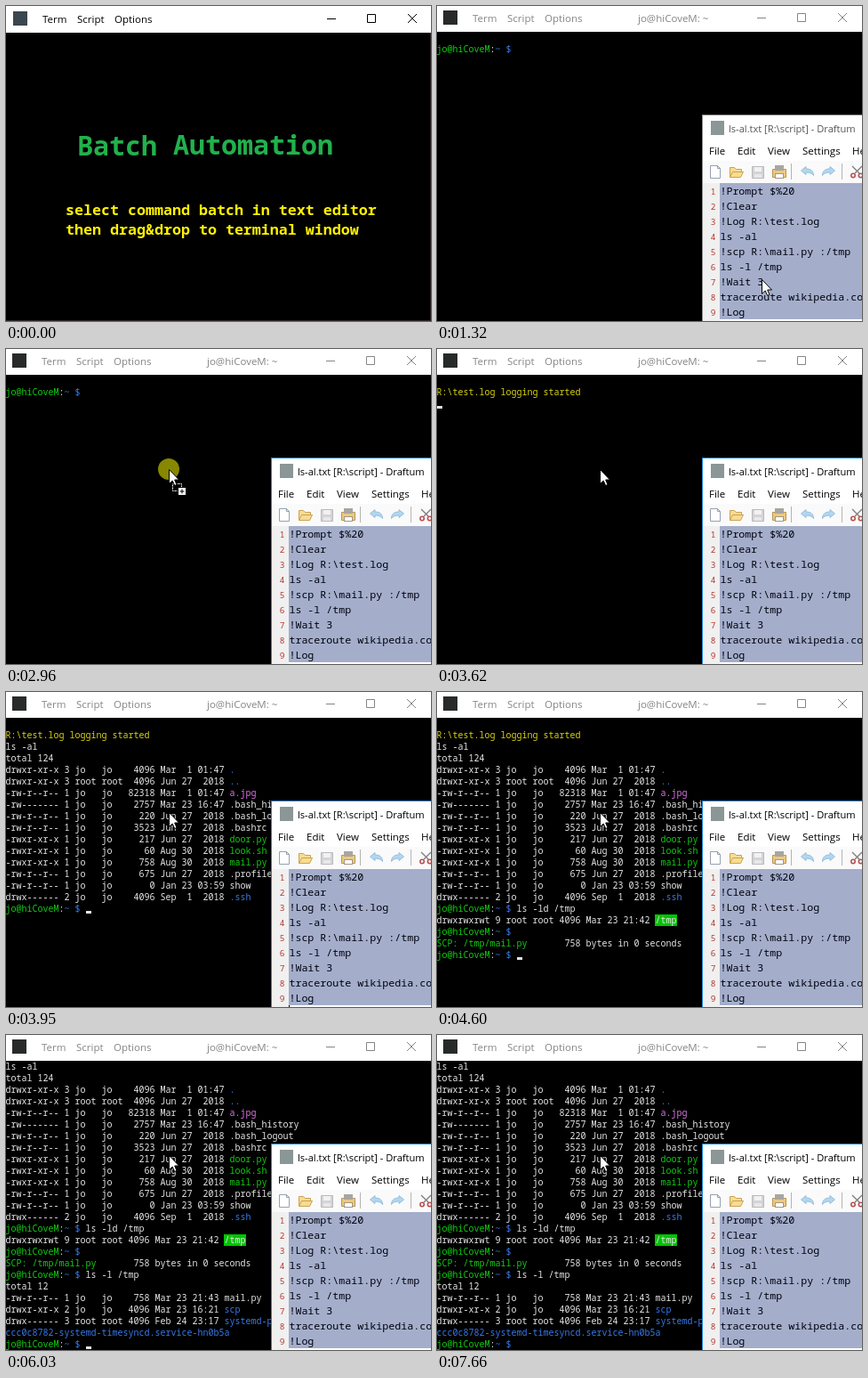
An HTML page that plays this animation: 478 px wide and 354 px high, repeating every 8000 ms.

```html
<!DOCTYPE html>
<html lang="en">
<head>
<meta charset="utf-8">
<title>Batch Automation</title>
<style>
  html, body { margin: 0; width: 100%; height: 100%; overflow: hidden; background: #000; }
  svg { display: block; width: 478px; height: 354px; }
  text { white-space: pre; }
  .ui { font: 11.5px "Open Sans", "Noto Sans", sans-serif; }
  .mono { font-family: "Noto Sans Mono", "DejaVu Sans Mono", monospace; }
  .term { font-size: 10px; font-weight: 500; fill: #e6e6e6; }
  .code { font-size: 11.667px; fill: #00000c; }
  .num { font-size: 9.5px; fill: #b5382a; text-anchor: end; }
  .g { fill: #10cc10; }
  .b { fill: #3679ea; }
  .y { fill: #d8d410; }
  .m { fill: #dc74e6; }
</style>
</head>
<body>
<svg id="stage" viewBox="0 0 478 354" xmlns="http://www.w3.org/2000/svg"></svg>
<script>
const LOOP = 8000;
const ROW = 13, COL = 6;

const rect = (x, y, w, h, fill, more = '') =>
  `<rect x="${x}" y="${y}" width="${w}" height="${h}" fill="${fill}" ${more}/>`;
const text = (x, y, cls, body, more = '') =>
  `<text x="${x}" y="${y}" class="${cls}" ${more}>${body}</text>`;
const path = (d, stroke, fill = 'none', more = '') =>
  `<path d="${d}" stroke="${stroke}" fill="${fill}" ${more}/>`;
const span = (cls, body) => `<tspan class="${cls}">${body}</tspan>`;

// Title bar with menu and window buttons
function titleBar(ink, icon, height, shift, title = '') {
  return rect(0, 0, 478, height, '#fff') +
    `<g transform="translate(${-shift} ${-shift})" fill="${ink}">` +
    rect(8, 6, 16, 16, icon) +
    text(41, 19, 'ui', 'Term') + text(80, 19, 'ui', 'Script') + text(122, 19, 'ui', 'Options') +
    text(227, 19, 'ui', title) +
    path('M361 14.5h10M406.5 9.5h9v9h-9zM452 9l10 10M462 9l-10 10', ink) +
    '</g>';
}

function introScene() {
  const big = 'font-size="30" font-weight="600" fill="#22b14c"';
  const note = 'font-size="16.667" font-weight="600" fill="#fff200"';
  return rect(0, 0, 478, 354, '#000') +
    path('M477.5 30V353.5H0', '#2a2226') +
    titleBar('#000', '#3b464e', 30, 0) +
    text(80, 168, 'mono', 'Batch', big) +
    text(188, 167, 'mono', 'Automation', big) +
    text(67, 235, 'mono', 'select command batch in text editor', note) +
    text(67, 257, 'mono', 'then drag&amp;drop to terminal window', note);
}

// Terminal content: [from, row, markup, until]
const prompt = span('g', 'jo@hiCoveM') + ':' + span('b', '~ $');
const listing = [
  ['drwxr-xr-x 3 jo   jo  ', 4096, 'Mar  1 01:47', '.', 'b'],
  ['drwxr-xr-x 3 root root', 4096, 'Jun 27  2018', '..', 'b'],
  ['-rw-r--r-- 1 jo   jo  ', 82318, 'Mar  1 01:47', 'a.jpg', 'm'],
  ['-rw------- 1 jo   jo  ', 2757, 'Mar 23 16:47', '.bash_history'],
  ['-rw-r--r-- 1 jo   jo  ', 220, 'Jun 27  2018', '.bash_logout'],
  ['-rw-r--r-- 1 jo   jo  ', 3523, 'Jun 27  2018', '.bashrc'],
  ['-rwxr-xr-x 1 jo   jo  ', 217, 'Jun 27  2018', 'door.py', 'g'],
  ['-rwxr-xr-x 1 jo   jo  ', 60, 'Aug 30  2018', 'look.sh', 'g'],
  ['-rwxr-xr-x 1 jo   jo  ', 758, 'Aug 30  2018', 'mail.py', 'g'],
  ['-rw-r--r-- 1 jo   jo  ', 675, 'Jun 27  2018', '.profile'],
  ['-rw-r--r-- 1 jo   jo  ', 0, 'Jan 23 03:59', 'show'],
  ['drwx------ 2 jo   jo  ', 4096, 'Sep  1  2018', '.ssh', 'b']
];
const entry = ([mode, size, date, name, cls = ''], width) =>
  `${mode} ${String(size).padStart(width)} ${date} ${span(cls, name)}`;

const LIST = 3950, TYPE = 4280, OUT = 4390, COPY = 4490, DONE = 4600, TYPE2 = 4930, SCROLL = 5050;
const after = cmd => ' '.repeat(15) + cmd;
const lines = [
  [1320, 1, prompt, 3400],
  [3620, 1, span('y', 'R:\\test.log logging started')],
  [LIST, 2, 'ls -al'],
  [LIST, 3, 'total 124'],
  ...listing.map((e, i) => [LIST, 4 + i, entry(e, 5)]),
  [LIST, 16, prompt],
  [TYPE, 16, after('ls -ld /tmp')],
  [OUT, 17, 'drwxrwxrwt 9 root root 4096 Mar 23 21:42 /tmp'],
  [OUT, 18, prompt],
  [COPY, 19, span('g', 'SCP: /tmp/mail.py') + '       758 bytes in 0 seconds'],
  [DONE, 20, prompt],
  [TYPE2, 20, after('ls -l /tmp')],
  [SCROLL, 21, 'total 12'],
  [SCROLL, 22, entry(['-rw-r--r-- 1 jo   jo  ', 758, 'Mar 23 21:43', 'mail.py'], 4)],
  [SCROLL, 23, entry(['drwxr-xr-x 2 jo   jo  ', 4096, 'Mar 23 16:21', 'scp', 'b'], 4)],
  [SCROLL, 24, entry(['drwx------ 3 root root', 4096, 'Feb 24 23:17', 'systemd-private', 'b'], 4)],
  [SCROLL, 25, span('b', 'ccc0c8782-systemd-timesyncd.service-hn0b5a')],
  [SCROLL, 26, prompt]
];

// Underscore position: [from, row, column]
const caretStops = [
  [0, 1, 15], [3400, 0, 0], [3620, 2, 0], [LIST, 16, 15], [TYPE, 16, 26],
  [OUT, 18, 15], [COPY, 19, 0], [DONE, 20, 15], [TYPE2, 20, 25], [SCROLL, 26, 15]
];
const underscoreFlips = [2410, 2960, 3400, 5480, 6030, 6460, 7010, 7560];
const editFlips = [1970, 2520, 3080, 3400, 3950, 4490, 5050, 5600, 6130, 6680, 7110, 7660];
const lit = (flips, t) => flips.filter(f => t >= f).length % 2 === 1;

const script = ['!Prompt $%20', '!Clear', '!Log R:\\test.log', 'ls -al', '!scp R:\\mail.py :/tmp',
  'ls -l /tmp', '!Wait 3', 'traceroute wikipedia.com', '!Log'];

function toolbar() {
  const undo = 'M409.5 185l5.500-4.500v2.500c6 0 8.500 3 8.500 7.500c-2-3-5-3.500-8.500-3.500v2.500z';
  return path('M307.5 179.5h8l3 3v11h-11zM315.5 179.5v3h3', '#95a1b0', '#fff') +
    path('M329.5 192.5v-11h5l2 2h6v3h2l-3 6z', '#c9a356', '#f7dc92') +
    path('M329.5 192.5l3-6h12', '#c9a356') +
    path('M354.5 180.5h13v13h-13z', '#b9b9bd', '#d4d4d8') +
    rect(357, 181, 8, 5, '#f2f2f2') + rect(357, 189, 8, 4, '#e8e8e8') +
    path('M377.5 183.5h15v9h-15z', '#b8955a', '#ecc97c') +
    rect(380, 179, 10, 6, '#a9a5a0') + rect(380.5, 188.5, 9, 5, '#fff', 'stroke="#a0988c"') +
    path('M398.5 177v18M455.5 177v18', '#b4b4b4') +
    path(undo, '#92bfe0', '#b4d6ee') +
    path(undo, '#92bfe0', '#b4d6ee', 'transform="translate(857 0) scale(-1 1)"') +
    path('M467 180l8 8M478 180l-8 8', '#808080', 'none', 'stroke-width="1.4"') +
    '<g fill="none" stroke="#b85050" stroke-width="1.6"><circle cx="468" cy="190.5" r="2.2"/>' +
    '<circle cx="476.5" cy="190.5" r="2.2"/></g>';
}

function editor() {
  const menu = [[306, 'File'], [338, 'Edit'], [372, 'View'], [411, 'Settings'], [467, 'Help']];
  return rect(298, 122, 190, 240, '#fff', 'id="frame"') +
    rect(299, 123, 190, 240, '#fff') +
    rect(308, 129, 15, 16, '#8b9697') +
    text(328, 142, 'ui', 'ls-al.txt [R:\\script] - Draftum', 'id="heading" style="font-size:11.1px"') +
    menu.map(([x, s]) => text(x, 167, 'ui', s)).join('') +
    rect(299, 174, 179, 25, '#fafafa') + toolbar() +
    rect(299, 199, 19, 155, '#f0f0f0') +
    rect(318, 199, 160, 153, '#a4aecb') +
    script.map((s, i) =>
      text(313.5, 212 + 17 * i, 'mono num', i + 1) + text(318.4, 212 + 17 * i, 'mono code', s)).join('') +
    rect(318, 352, 1, 2, '#000', 'id="edit"');
}

function pointer() {
  return '<g id="pointer">' +
    '<circle id="halo" r="12" fill="#ff0" fill-opacity=".53"/>' +
    '<g id="copy">' +
    path('M4.5 16.5h10v8h-10z', '#fff', 'none', 'stroke-dasharray="2 1"') +
    rect(10.5, 20.5, 9, 9, '#fff', 'stroke="#000"') + path('M12.5 25h5M15 22.5v5', '#000') +
    '</g>' +
    path('M.5 .5V16.5L4.2 13L6.7 18.5L9 17.5L6.7 12H11.5Z', '#000', '#fff') +
    '</g>';
}

const rows = lines.map(([, r, body]) =>
  `<g class="line">${r === 17 ? rect(41 * COL - 1, 29 + ROW * r, 25, 13, '#00c400') : ''}` +
  text(-0.5, 39 + ROW * r, 'mono term', body) + '</g>').join('');

document.getElementById('stage').innerHTML =
  `<g id="intro">${introScene()}</g><g id="desk">` + rect(0, 0, 478, 354, '#000') +
  `<g id="screen">${rows}` + rect(0, 0, COL, 3, '#e4e4e4', 'id="under"') + '</g>' +
  titleBar('#858585', '#272a29', 29, 1, 'jo@hiCoveM: ~') + editor() + pointer() + '</g>';

const $ = id => document.getElementById(id);
const lineNodes = document.querySelectorAll('.line');
const show = (node, on) => node.setAttribute('visibility', on ? 'inherit' : 'hidden');
const mix = (a, b, p) => a + (b - a) * p;

// The pointer moves in steps of about 110 ms
const steps = (t, start, count) =>
  Math.max(0, Math.min(1, (Math.floor((t - start) / 110) + 1) / count));

function pointerAt(t) {
  if (t < 2300) {
    const p = steps(t, 1420, 3);
    return [mix(365, 346, p), mix(307, 293, p)];
  }
  const p = steps(t, 2300, 5), e = p * p * (3 - 2 * p);
  return [mix(346, 183, e), mix(293, 135, e)];
}

function draw(t) {
  const intro = t < 1320;
  $('intro').style.display = intro ? '' : 'none';
  $('desk').style.display = intro ? 'none' : '';
  if (intro) return;

  lines.forEach(([from, , , until = LOOP], i) => show(lineNodes[i], t >= from && t < until));
  $('screen').setAttribute('transform', `translate(0 ${t < SCROLL ? 0 : -2 * ROW})`);

  const [, row, col] = caretStops.filter(s => t >= s[0]).pop();
  $('under').setAttribute('x', col * COL);
  $('under').setAttribute('y', 38 + row * ROW);
  show($('under'), lit(underscoreFlips, t));

  const active = t >= 1970;
  $('frame').setAttribute('fill', active ? '#1a86d8' : '#8c8c8c');
  $('heading').setAttribute('fill', active ? '#000' : '#555');
  show($('edit'), lit(editFlips, t));

  const [x, y] = pointerAt(t);
  $('pointer').setAttribute('transform', `translate(${Math.round(x)} ${Math.round(y)})`);
  show($('halo'), t >= 1970 && t < 3080);
  show($('copy'), t >= 2300 && t < 3080);
}

const begin = performance.now();
function tick() {
  draw((performance.now() - begin) % LOOP);
  requestAnimationFrame(tick);
}
tick();
</script>
</body>
</html>
```
